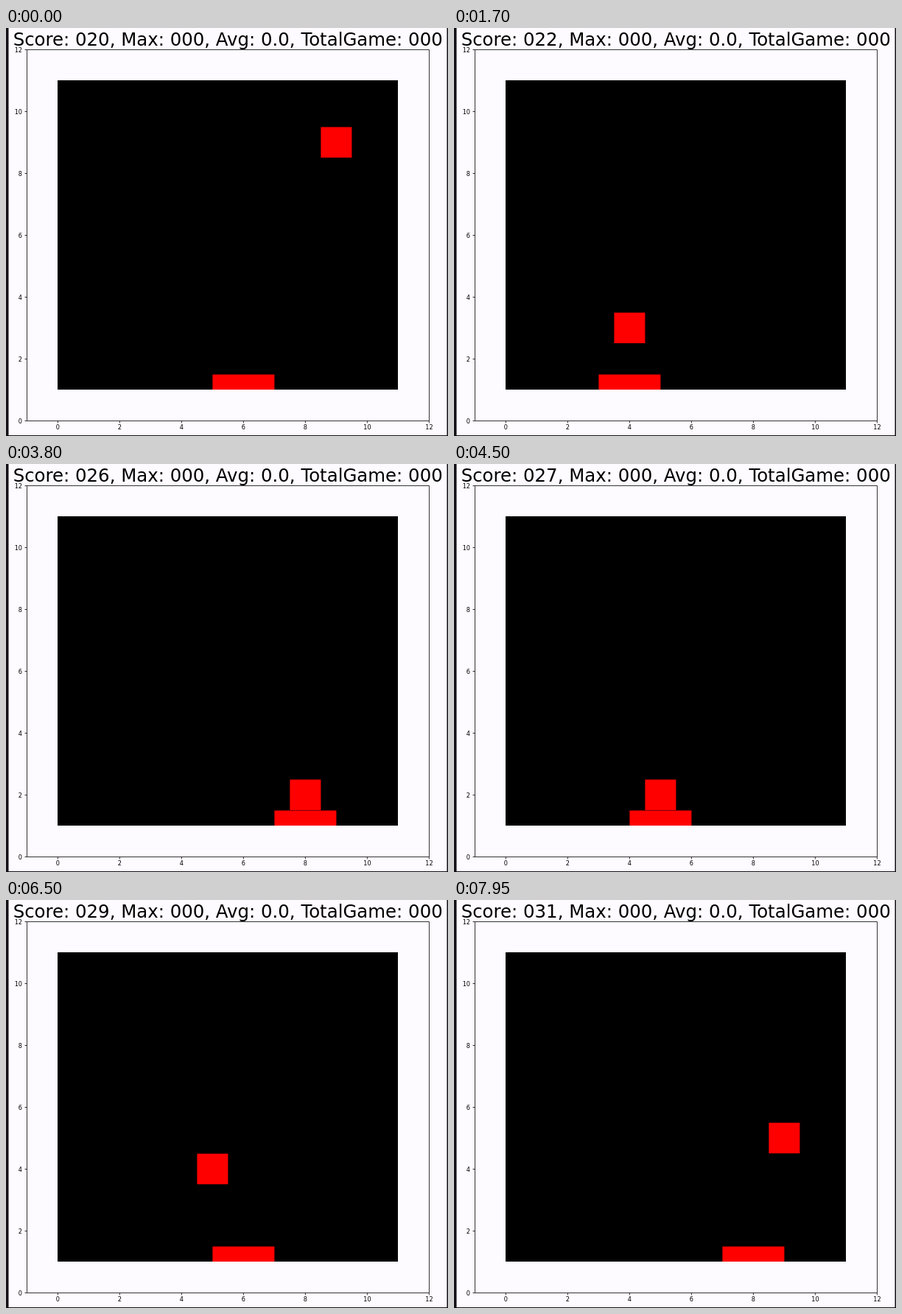
An HTML page that plays this animation: 600x554 px, repeating every 8000 ms.

```html
<!DOCTYPE html>
<html lang="en">
<head>
<meta charset="utf-8">
<title>Catch game</title>
<style>
  html, body { margin: 0; width: 100%; height: 100%; overflow: hidden; background: #111; }
  svg { display: block; width: 600px; height: 554px; }
  text { font-family: "DejaVu Sans", sans-serif; font-size: 8.14px; fill: #000; }
  #title { font-size: 24.43px; text-anchor: middle; }
  .red { fill: #f00; }
  .axis { fill: none; stroke: #000; stroke-width: .8; }
</style>
</head>
<body>
<svg viewBox="0 0 600 554">
  <rect width="600" height="554" fill="#141216"/>
  <rect x="3.5" width="595" height="553" fill="#fdfbff"/>
  <rect x="70" y="71" width="462" height="420"/>
  <rect id="paddle" class="red" y="470.5" width="84" height="20.5"/>
  <rect id="ball" class="red" width="42" height="41.5"/>
  <path class="axis" d="M28.5 29.5H574.5V533.5H28.5Z"/>
  <g id="ticks"></g>
  <text id="title" x="301.2" y="24.3"></text>
</svg>
<script>
const CELL = 42, LEFT = 70.4, FLOOR = 533.5;
const LOOP = 8000, TICK = 50;
const FALL = 9;   // steps from the top row to the catch row
const LAG = 3;    // steps before the paddle reacts
const LAST = 103;
const columns = [9, 6, 4, 2, 7, 8, 5, 6, 10, 5, 5, 9];
// [step, ms]: the game slows down a little as it runs
const pace = [[0, -21], [25, 1745], [36, 2545], [43, 3110], [62, 4540], [77, 5762], [87, 6568], [103, 7945]];

const byId = id => document.getElementById(id);
const px = x => LEFT + CELL * x;
const py = y => FLOOR - CELL * y;

function stepAt(ms) {
  const i = pace.findIndex(([, end], k) => k && ms < end);
  if (i < 0) return LAST;
  const [n0, t0] = pace[i - 1], [n1, t1] = pace[i];
  return Math.floor(n0 + (n1 - n0) * (ms - t0) / (t1 - t0) + 1e-6);
}

function play() {
  const states = [];
  let paddle = 6;
  for (let n = 0; n <= LAST; n++) {
    const drop = Math.floor((n + 1) / FALL), age = (n + 1) % FALL;
    const x = columns[drop];
    if (age >= LAG) paddle += Math.sign(x - paddle);
    states.push({ x, y: 10 - age, paddle, score: 20 + drop + (age === FALL - 1 ? 1 : 0) });
  }
  return states;
}

function drawTicks() {
  let out = "";
  for (let v = 0; v <= 12; v += 2) {
    const x = px(v), y = py(v);
    out += `<path class="axis" d="M${x} 533.5v3M28.5 ${y}h-3"/>
      <text x="${x}" y="545" text-anchor="middle">${v}</text>
      <text x="22" y="${y + 3}" text-anchor="end">${v}</text>`;
  }
  byId("ticks").innerHTML = out;
}

const states = play();
const ball = byId("ball"), paddle = byId("paddle"), title = byId("title");
let shown = -1;

function render(now) {
  const ms = Math.floor(now % LOOP / TICK) * TICK;
  const n = stepAt(ms);
  if (n !== shown) {
    shown = n;
    const s = states[n];
    ball.setAttribute("x", px(s.x - .5));
    ball.setAttribute("y", py(s.y + .5));
    paddle.setAttribute("x", px(s.paddle - 1));
    title.textContent = `Score: ${String(s.score).padStart(3, "0")}, Max: 000, Avg: 0.0, TotalGame: 000`;
  }
}

drawTicks();
render(0);
const start = performance.now();
(function frame() {
  render(performance.now() - start);
  requestAnimationFrame(frame);
})();
</script>
</body>
</html>
```
